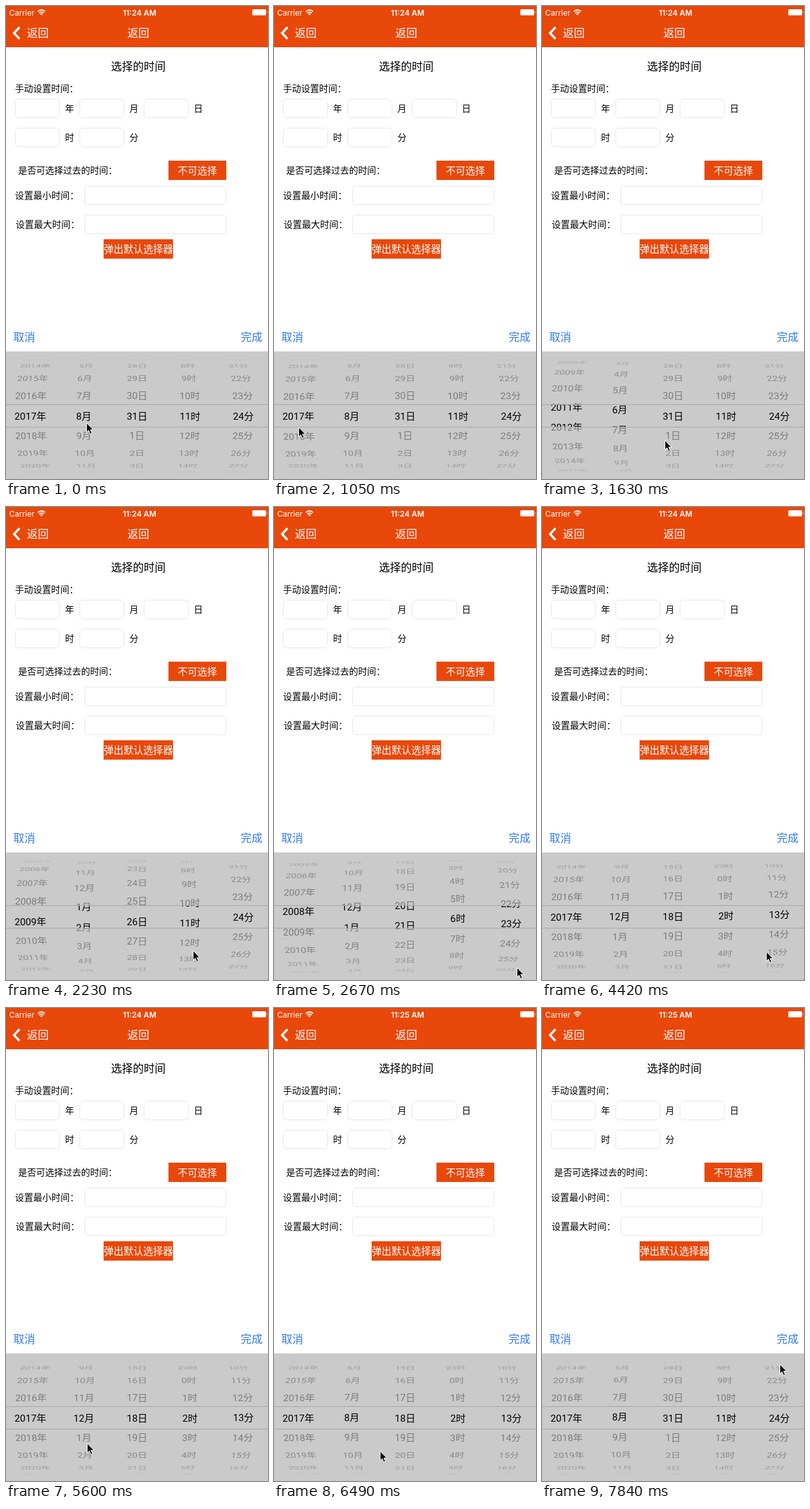
Write an HTML page that moves like this. It is 408 by 734 pixels and loops after 7990 ms.

```html
<!DOCTYPE html>
<html lang="zh-CN">
<head>
<meta charset="utf-8">
<title>Date picker</title>
<style>
  html, body { margin: 0; width: 100%; height: 100%; overflow: hidden; background: #fff; }
  svg { display: block; width: 408px; height: 734px; }
  text { font-family: Roboto, "Noto Sans CJK SC", "Noto Sans CJK", sans-serif; white-space: pre; }
  .status { font-family: Inter, Roboto, sans-serif; }
</style>
</head>
<body>
<svg id="stage" viewBox="0 0 408 734" xmlns="http://www.w3.org/2000/svg">
  <defs>
    <clipPath id="band"><rect x="0" y="618" width="408" height="36"/></clipPath>
    <clipPath id="rest"><path d="M0 536H408V618H0ZM0 654H408V734H0Z"/></clipPath>
  </defs>
  <rect width="408" height="734" fill="#fff"/>
  <rect width="408" height="64" fill="#e8480a"/>

  <g fill="none" stroke="#fff" stroke-width="1.7">
    <path d="M49.6 8.6Q55.2 3.4 60.8 8.6"/>
    <path d="M51.7 11Q55.2 7.8 58.7 11"/>
  </g>
  <path d="M53.2 12.4Q55.2 10.8 57.2 12.4L55.2 14.6Z" fill="#fff"/>
  <rect x="383.5" y="5" width="21.5" height="9.5" rx="1.6" fill="#fff"/>
  <path d="M406 8Q407.6 9.8 406 11.6Z" fill="#fff"/>
  <path d="M21 33L12.5 42L21 51" fill="none" stroke="#fff" stroke-width="3.4"/>

  <g id="fields" fill="#fff" stroke="#e0e0e0" stroke-width="0.8"></g>
  <rect x="253" y="240" width="90" height="30" fill="#e8480a"/>
  <rect x="152" y="362" width="108" height="30" fill="#e8480a"/>
  <g id="labels"></g>

  <rect y="536" width="408" height="198" fill="#cacaca"/>
  <g id="dim" clip-path="url(#rest)"></g>
  <g id="lit" clip-path="url(#band)"></g>
  <path d="M0 618.5H408M0 653.5H408" stroke="#a6a6a6"/>
  <path id="cursor" d="M0 0V14.6L3.3 11.5L5.7 17L8.2 15.9L5.8 10.6H10.4Z"
        fill="#000" stroke="#fff" stroke-width="1" stroke-linejoin="round"/>
</svg>
<script>
const LOOP = 7990, TICK = LOOP / 54;
const MID_Y = 636, RADIUS = 87.5, ROW_ANGLE = 0.362, DEPTH = 1000;
const $ = id => document.getElementById(id);

function add(parent, tag, attrs, content) {
  const el = document.createElementNS('http://www.w3.org/2000/svg', tag);
  for (const k in attrs) el.setAttribute(k, attrs[k]);
  if (content) el.textContent = content;
  parent.appendChild(el);
  return el;
}

function label(str, x, y, size, more) {
  return add($('labels'), 'text', { x, y: y + size * 0.38, 'font-size': size, fill: '#000', ...more }, str);
}

function field(x, y, width) {
  add($('fields'), 'rect', { x: x + 0.5, y: y + 0.5, width: width - 1, height: 29, rx: 5 });
}

const white = { fill: '#fff' }, blue = { fill: '#3079f2' };
const mid = { 'text-anchor': 'middle' };

label('Carrier', 5, 10.5, 12, { ...white, class: 'status' });
const clock = label('11:24 AM', 208, 10.5, 12, { ...white, ...mid, class: 'status', 'font-weight': 600 });
label('返回', 32.5, 42, 17, white);
label('返回', 206, 42, 17, { ...white, ...mid, 'font-weight': 500 });
label('选择的时间', 206, 94, 17, mid);
label('手动设置时间：', 14, 127.5, 14.1);
[...'年月日时分'].forEach((unit, i) => {
  const x = 14 + i % 3 * 100.3, y = i < 3 ? 144 : 189;
  field(x, y, 70);
  label(unit, x + 78, y + 15, 14);
});
label('是否可选择过去的时间：', 19, 255, 14);
label('设置最小时间：', 14, 293.5, 14.2);
label('设置最大时间：', 15, 338.5, 14.2);
field(122, 279, 221);
field(122, 324, 221);
label('不可选择', 298, 255, 15.3, { ...white, ...mid });
label('弹出默认选择器', 206, 377, 15.4, { ...white, ...mid });
label('取消', 11.5, 514, 17, blue);
label('完成', 365.5, 514, 17, blue);

const clamp = u => Math.max(0, Math.min(1, u));
const smooth = u => u * u * (3 - 2 * u);
const wrap = (v, n) => ((v % n) + n) % n;

// A flick speeds up under the finger, then coasts to rest at the same speed.
const PULL = 400, COAST = 400, PULLED = PULL / (PULL + 2 * COAST);
const flick = (start, rows) => t => {
  const d = t - start;
  if (d <= 0) return 0;
  if (d < PULL) return rows * PULLED * (d / PULL) ** 2;
  return rows * (1 - (1 - PULLED) * Math.exp((PULL - d) / COAST));
};

// A glide is the picker scrolling itself back to an allowed date.
const glide = (start, rows) => t => rows * smooth(clamp((t - start) / 500));

const RESET = 6650;
const wheels = [
  { x: 38, from: 2017, press: 1004, text: v => v + '年',
    moves: [flick(1004, -9), glide(3180, 9)] },
  { x: 121, from: 8, press: 1309, text: v => wrap(v - 1, 12) + 1 + '月',
    moves: [flick(1309, -8), flick(5640, -5), glide(RESET, 1)] },
  { x: 204, from: 31, press: 1776, text: v => wrap(v - 1, 31) + 1 + '日',
    moves: [flick(1776, -13), glide(RESET, 13)] },
  { x: 286.5, from: 11, press: 2092, text: v => wrap(v, 24) + '时',
    moves: [flick(2092, -9), glide(RESET, 9)] },
  { x: 369.5, from: 24, press: 2422, text: v => wrap(v, 60) + '分',
    moves: [flick(2422, -11), glide(RESET, 11)] }
];

const font = { 'font-size': 15.2, 'text-anchor': 'middle', y: 5.6 };
for (const w of wheels) {
  w.rows = [];
  for (let k = -4; k <= 4; k++) {
    const els = [add($('dim'), 'text', font)];
    if (Math.abs(k) < 2) els.push(add($('lit'), 'text', font));
    w.rows.push({ k, els });
  }
}

function drawWheel(w, t) {
  const pos = w.moves.reduce((sum, move) => sum + move(t), w.from);
  const base = Math.round(pos), off = w.x - 204;
  for (const { k, els } of w.rows) {
    const a = (base + k - pos) * ROW_ANGLE, c = Math.cos(a), sin = Math.sin(a);
    const s = DEPTH / (DEPTH + RADIUS * (1 - c));
    const m = [s, 0, -off * sin / DEPTH, Math.max(c, 0.01), 204 + off * s, MID_Y + RADIUS * sin];
    for (const el of els) {
      el.textContent = w.text(base + k);
      el.setAttribute('transform', `matrix(${m.map(n => n.toFixed(4))})`);
    }
    els[0].setAttribute('opacity', Math.abs(a) < 1.5 ? 0.41 * Math.pow(c, 0.8) : 0);
  }
}

// The pointer drags each wheel down in turn, with a few resting points around that.
const path = [
  [0, 125.5, 647], [150, 119.5, 650], [450, 119.5, 650],
  ...wheels.flatMap(w => [[w.press, w.x, 650], [w.press + 200, w.x + 7, 705]]),
  [1630, 191.5, 674], [2665, 378.5, 715], [3250, 362.5, 689], [4420, 349.5, 690],
  [5010, 307, 690], [5600, 126.5, 675], [5800, 128, 697], [7240, 204, 678], [7840, 370.5, 553]
].sort((a, b) => a[0] - b[0]);

function drawCursor(t) {
  const i = path.findLastIndex(p => p[0] <= t);
  const a = path[i], b = path[i + 1] || a;
  const u = b === a ? 0 : smooth((t - a[0]) / (b[0] - a[0]));
  const at = n => (a[n] + (b[n] - a[n]) * u).toFixed(2);
  $('cursor').setAttribute('transform', `translate(${at(1)} ${at(2)})`);
}

function draw(time) {
  // The screen refreshes in even steps, a touch early.
  const t = Math.floor((time % LOOP + 24) / TICK) % 54 * TICK;
  wheels.forEach(w => drawWheel(w, t));
  clock.textContent = t < 5880 ? '11:24 AM' : '11:25 AM';
  drawCursor(t);
}

const start = performance.now();
function loop() {
  draw(performance.now() - start);
  requestAnimationFrame(loop);
}
loop();
</script>
</body>
</html>
```
